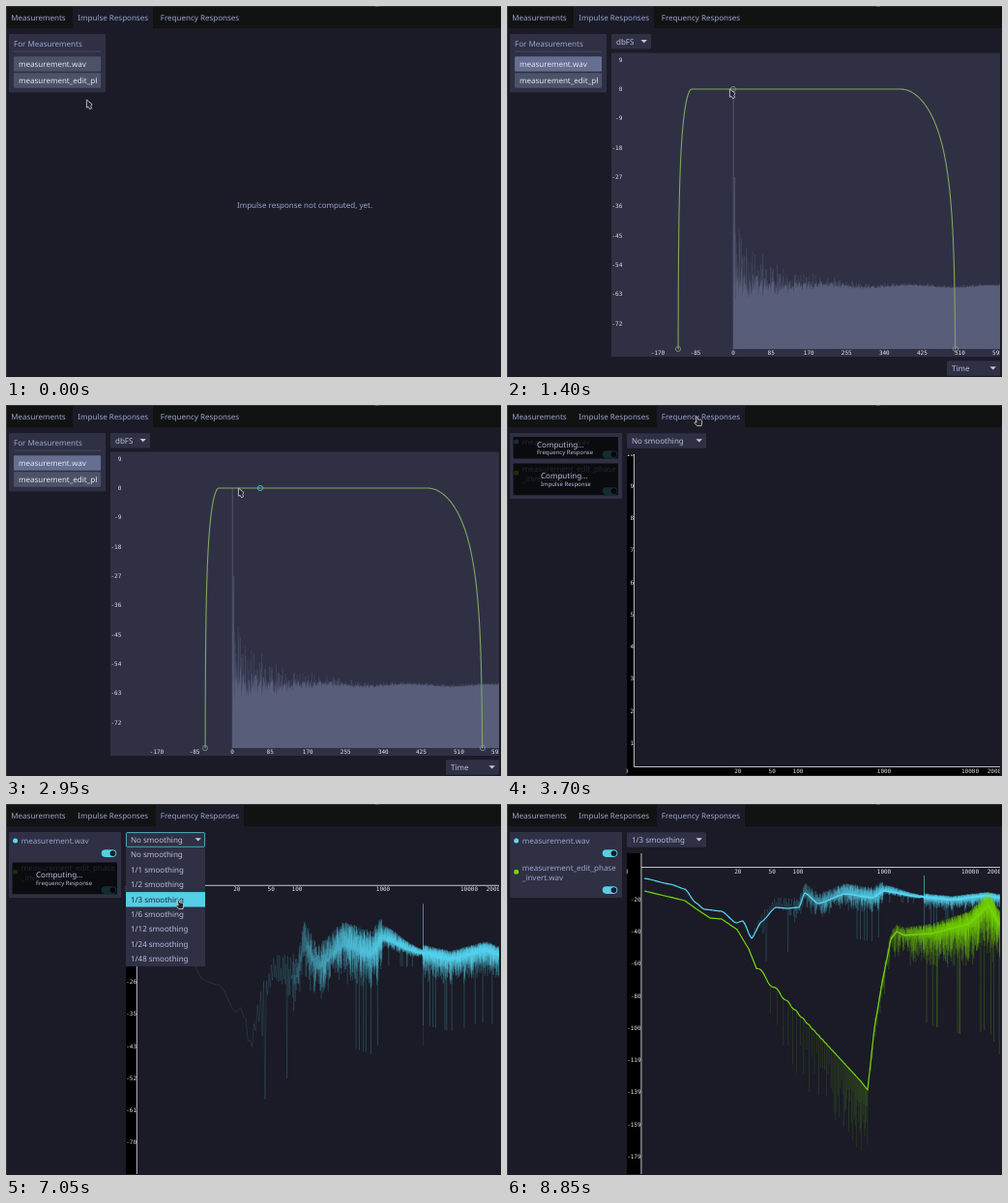
An HTML page for the animation above (9600 ms loop, 512 by 384 pixels).

```html
<!DOCTYPE html>
<html lang="en">
<head>
<meta charset="utf-8">
<title>Impulse and frequency responses</title>
<style>
  html, body { margin: 0; width: 100%; height: 100%; overflow: hidden; background: #1a1b26; }
  svg { display: block; width: 512px; height: 384px; }
  text { font: 8px "Noto Sans", sans-serif; fill: #9aa5ce; white-space: pre; text-rendering: geometricPrecision; }
  .lit { fill: #e4e6ef; }
  .soft { fill: #b9c0dc; }
  .small { font-size: 6px; }
  .num { font: 6px "DejaVu Sans Mono", monospace; fill: #e2e3e8; }
  .mid { text-anchor: middle; }
  .end { text-anchor: end; }
  .line { fill: none; stroke-linejoin: round; vector-effect: non-scaling-stroke; }
</style>
</head>
<body>
<svg id="stage" viewBox="0 0 512 384"></svg>
<script>
const LOOP = 9600, STEP = 50;
const PANEL = '#2f3044', BASE = '#1a1b26', CYAN = '#5cd8f5', GREEN = '#76d60c', FOCUS = '#55cfe5';

const rect = (x, y, w, h, fill, extra = '') =>
  `<rect x="${x}" y="${y}" width="${w}" height="${h}" fill="${fill}" ${extra}/>`;
const text = (x, y, s, cls = '', extra = '') =>
  `<text x="${x}" y="${y}" class="${cls}" ${extra}>${s}</text>`;
const dot = (x, y, r, fill, extra = '') =>
  `<circle cx="${x}" cy="${y}" r="${r}" fill="${fill}" ${extra}/>`;
const line = (d, color, width = 1, opacity = 1) =>
  `<path class="line" d="${d}" stroke="${color}" stroke-width="${width}" stroke-opacity="${opacity}"/>`;
const group = (id, body, extra = '') => `<g id="${id}" ${extra}>${body}</g>`;
const range = n => [...Array(n).keys()];
const smooth = u => u * u * (3 - 2 * u);

function random(seed) {
  return () => {
    seed = (seed * 1664525 + 1013904223) >>> 0;
    return seed / 4294967296;
  };
}

// Piecewise interpolation; each key is [position, value, ...].
function at(keys, x, col = 1, ease = u => u) {
  if (x <= keys[0][0]) return keys[0][col];
  for (let i = 1; i < keys.length; i++) {
    const a = keys[i - 1], b = keys[i];
    if (x <= b[0]) return a[col] + (b[col] - a[col]) * ease((x - a[0]) / (b[0] - a[0]));
  }
  return keys[keys.length - 1][col];
}

const points = s => s.split(' ').map(p => p.split(',').map(Number));
const poly = pts => 'M' + pts.map(p => p[0].toFixed(2) + ' ' + p[1].toFixed(1)).join('L');
const plot = (fn, from, to, dx) =>
  poly(range(Math.floor((to - from) / dx) + 1).map(i => [from + i * dx, fn(from + i * dx)]));

/* ---------- shared widgets ---------- */
const arrow = (x, y) => `<path d="M${x} ${y}h6.4l-3.2 3.2z" fill="#c3c8dc"/>`;
const pick = (x, y, w, label, id = '') =>
  rect(x, y, w, 15.4, PANEL, 'rx="1"') + text(x + 5, y + 10.5, label, 'soft', id && `id="${id}"`) +
  arrow(x + w - 10.5, y + 6);

const tabs = rect(0, 0, 512, 23, '#111313') +
  rect(69, 1, 83, 22, BASE, 'id="tabIR"') + rect(155, 1, 91, 22, BASE, 'id="tabFR"') +
  text(5.3, 14.5, 'Measurements') + text(74.3, 14.5, 'Impulse Responses') +
  text(159.8, 14.5, 'Frequency Responses') +
  rect(0, 0, 512, 1, '#2b3338') + rect(382, 0, 4, 1, '#3a5a78') + rect(0, 0, 1, 384, '#32353d');

/* ---------- impulse page ---------- */
const list = rect(3, 29, 100, 60.5, PANEL, 'rx="1"') + text(8, 42, 'For Measurements') +
  rect(8, 46.7, 90, 0.8, '#4a4d66') +
  rect(8, 52.3, 90, 15.4, '#4c5268', 'rx="1" id="btn"') + text(13, 62.9, 'measurement.wav', 'lit') +
  rect(8, 69.3, 90, 15.4, '#4c5268', 'rx="1"') +
  `<g clip-path="url(#btnClip)">${text(13, 79.9, 'measurement_edit_phase', 'lit')}</g>`;

// Two exponential decays above a gently waving noise floor.
function impulseBars() {
  const rnd = random(11);
  let solid = 'M234 355', spikes = '';
  for (let x = 234.5; x <= 510; x += 0.5) {
    const d = x - 234, wave = 1.2 * Math.sin(x / 14);
    const up = 288 + wave - 85 * Math.exp(-d / 4) - 58 * Math.exp(-d / 50);
    const down = 291 + wave + 20 * Math.exp(-d / 50);
    solid += `L${x} ${(down - (down - up) * rnd() * 0.5).toFixed(1)}`;
    spikes += `M${x} 355V${(up + (down - up) * rnd() ** 0.6).toFixed(1)}`;
  }
  return `<path d="${solid}V355Z" fill="#5a607c"/>` + line(spikes, '#5a607c', 0.5, 0.7) +
    line('M234.2 355V86', '#5a607c', 0.8) + line('M235.6 355V177', '#5a607c', 0.7);
}

const ring = (x, y, extra = 'stroke="#8c91a3"') => dot(x, y, 2.6, 'none', `stroke-width=".8" ${extra}`);

// Tapered window on the dB scale: a quarter of each side is a raised cosine.
function windowPath() {
  const y = u => Math.min(355, 86 - 20 * Math.log10(0.5 - 0.5 * Math.cos(Math.PI * u) || 1e-9) * 3.367);
  const us = range(91).map(i => (i / 90) ** 2);
  const rise = us.map(u => [177 + 14.25 * u, y(u)]);
  const fall = us.map(u => [464 - 57.5 * u, y(u)]).reverse();
  return poly(rise.concat(fall));
}

const impulse = pick(108, 29, 41, 'dbFS') + pick(455, 367.3, 55, 'Time') +
  rect(108, 48.5, 402, 314.5, PANEL) +
  `<g clip-path="url(#irClip)">` + impulseBars() +
  range(10).map(i => text(119.3, 57.6 + i * 30.33, 9 - 9 * i, 'num end')).join('') +
  range(10).map(i => text(156 + i * 39.05, 360.8, -170 + 85 * i, 'num mid')).join('') +
  group('win', line(windowPath(), '#80a85c', 1.1) + ring(177, 355) + ring(464, 355) +
    ring(234, 86, 'id="grip"')) + '</g>';

/* ---------- frequency page ---------- */
const toggle = y => rect(98.7, y, 15.6, 7.6, FOCUS, 'rx="3.8"') + dot(110.5, y + 3.8, 2.9, BASE);
const busy = (id, y, h) => group(id, rect(6.5, y, 108.5, h, '#000', 'opacity=".78"') +
  text(31, y + h / 2 - 0.6, 'Computing...', 'soft') +
  text(31, y + h / 2 + 6.6, 'Frequency Response', 'soft small'));

const cards = rect(3, 29, 116, 68, PANEL, 'rx="1"') +
  dot(9.6, 38, 2.5, CYAN) + text(15.8, 41, 'measurement.wav') + toggle(47.3) +
  dot(9.6, 70.3, 2.5, GREEN) + text(15.8, 68.6, 'measurement_edit_phase') +
  text(15.8, 78.8, '_invert.wav') + toggle(85.3) +
  busy('busy1', 33, 22.5) + busy('busy2', 60.5, 32.8);

const freqX = f => 301 + 89 * Math.log10(f / 100);
const freqAt = x => 100 * 10 ** ((x - 301) / 89);

function axes(id, ax, ay, zero, step, strip = '') {
  const label = i => {
    const y = zero - 33.25 * i;
    return i && y > 48 && y < 376 ? text(ax - 0.3, y + 2.1, Math.round(step * i), 'num end') : '';
  };
  return group(id, rect(124, 51, ax - 124, 332, '#000') + strip +
    line(`M${ax} 51V${strip ? ay : 383}M${ax} ${ay}H510`, '#d5d6da', 0.9) +
    range(20).map(i => label(i - 9)).join('') + text(123.6, ay + 6, 0, 'num mid') +
    [20, 50, 100, 1000, 10000, 20000].map(f => text(freqX(f), ay + 6, f, 'num mid')).join(''),
    'clip-path="url(#frClip)"');
}

const cyanKeys = points('142,77 169,83 184,88 195,102 204,109 222,111 237,123 244,121 253,139 263,122 ' +
  '278,107 290,108 302,107 308,92 322,103 350,93 378,97 390,90 425,96 460,99 497,95 509,97');
const greenKeys = points('142,90 184,100 195,108 210,118 222,119 238,130 250,150 258,170 366,287 373,296 ' +
  '380,232 388,185 397,140 403,132 411,136 440,134 478,124 498,105 509,125');

const cyanFit = x => at(cyanKeys, x, 1, u => (u + smooth(u)) / 2);
// The falling slope carries a comb ripple, evenly spaced in hertz.
const COMB = 19.5;
const ripple = x => x < 258 || x > 366 ? 0
  : -4 * Math.cos(2 * Math.PI * (freqAt(x) - 38) / COMB) * Math.exp((258 - x) / 25);
const greenFit = x => at(greenKeys, x) + ripple(x);

// Distance of the raw bins above and below the fitted curve.
function cyanSpread(x) {
  if (x > 431.5) return [4, 13];
  if (x > 389) return [7 - (x - 389) / 8, 5 - (x - 389) / 14];
  const ramp = Math.min(1, Math.max(0, (x - 238) / 30));
  return [11 * ramp, 18 * ramp + 30 * Math.exp(-Math.abs(x - 253) / 1.2)];
}
const greenSpread = x => [6 + (x - 376) / 14, 24 + (x - 376) / 4.5];

// One jagged pass; bins crowd together on the log axis.
function jagged(fit, spread, from, seed, deep) {
  const rnd = random(seed * 7919), out = [];
  let low = false;
  for (let x = from; x < 510; x += Math.max(0.4, 2.2 * 10 ** ((250 - x) / 89))) {
    const [up, down] = spread(x);
    const fall = rnd() < deep ? 2.5 : rnd() * rnd();
    out.push([x, fit(x) + (low ? down * fall : -up * rnd() ** 0.7)]);
    low = !low;
  }
  return poly(out);
}

// Passes start further and further right, so the haze thickens with frequency.
const haze = (fit, spread, from, gap, count, color, opacity) =>
  range(count).map(i => line(jagged(fit, spread, from + gap * i, i + 3, 0.012), color, 0.6, opacity)).join('');

const cyanRaw = line(jagged(cyanFit, cyanSpread, 142, 2, 0.02), CYAN, 0.7, 0.17) +
  haze(cyanFit, cyanSpread, 296, 14, 10, CYAN, 0.19) +
  line('M431.5 74V98', CYAN, 0.8, 0.75) + line('M431.5 98V138', CYAN, 0.6, 0.2);

function greenRaw() {
  const rnd = random(23);
  let comb = '';
  for (let f = 38 + COMB / 2; f < 650; f += COMB / 2) {
    const x = freqX(f), y = greenFit(x);
    comb += `M${x.toFixed(1)} ${y.toFixed(1)}V${(y + 15 + 60 * rnd()).toFixed(1)}`;
  }
  return line(plot(greenFit, 142, 258, 2), GREEN, 0.7, 0.2) + line(comb, GREEN, 0.6, 0.22) +
    haze(greenFit, greenSpread, 376, 10, 11, GREEN, 0.2);
}

const options = ['No', '1/1', '1/2', '1/3', '1/6', '1/12', '1/24', '1/48'].map(s => s + ' smoothing');
const ROW = 15.4, MENU = 44.9;
const menu = rect(124, MENU, 82, ROW * 8, PANEL) + rect(124, MENU, 82, ROW, FOCUS, 'id="hover"') +
  options.map((s, i) => text(129, MENU + 10.5 + i * ROW, s, 'soft')).join('');

const response = cards +
  axes('axEmpty', 131.4, 374.5, 383, 1, rect(124, 375, 386, 8, '#000')) +
  axes('axOne', 135.3, 84.3, 84.3, 8.69) +
  axes('axTwo', 138.9, 65.5, 65.5, 19.91) +
  `<g clip-path="url(#frClip)">` + group('cyan', cyanRaw) + group('green', greenRaw()) +
  group('cyanFit', line(plot(cyanFit, 142, 509, 1), CYAN, 1.2)) +
  group('greenFit', line(plot(greenFit, 142, 509, 1), GREEN, 1.2)) + '</g>' +
  pick(124, 29.3, 82, options[0], 'choice') +
  rect(124.4, 29.6, 81.2, 14.7, 'none', `id="focus" rx="1" stroke="${FOCUS}" stroke-width=".8"`) +
  group('menu', menu);

/* ---------- stage ---------- */
const clip = (id, x, y, w, h) => `<clipPath id="${id}">${rect(x, y, w, h, '#000')}</clipPath>`;
const skin = 'fill="#24262c" stroke="#d9dadd" stroke-width=".8" stroke-linejoin="round"';
const stage = document.getElementById('stage');
stage.innerHTML = '<defs>' + clip('btnClip', 8, 69, 86, 16) + clip('irClip', 108, 48, 402, 315) +
  clip('frClip', 123.5, 51, 386.5, 333) + '</defs>' + rect(0, 0, 512, 384, BASE) + tabs +
  group('list', list) + text(309, 209, 'Impulse response not computed, yet.', 'mid', 'id="empty"') +
  group('impulse', impulse) + group('response', response) +
  group('cursor', `<path id="point" d="M.4 0V8.2L2.2 7.4 3.6 9.8 5.5 8.8 4.8 6.6 6 4.6Z" ${skin}/>` +
    `<path id="hand" d="M-1.9 0Q-.9-.8-.3.4L.7 3 3.5 3.2Q4.9 3.6 4.7 5.6L4.1 9.6H-.3L-3.1 6.4Q-3.1 5.2-1.7 5.8L-.9 6Z" ${skin}/>`);

const $ = id => document.getElementById(id);
const show = (id, on) => $(id).setAttribute('display', on ? 'inline' : 'none');
const set = (id, key, value) => $(id).setAttribute(key, value);

// Keys: [time, shift] for the window, [time, x, y] for the pointer.
const drag = [[1450, 0], [2050, 34], [2100, 34], [2500, 62], [2750, 62], [2950, 29], [3000, 10], [3100, 0]];
const path = [[0, 83, 97], [200, 132, 126], [450, 58, 60], [500, 56, 60], [1150, 56, 60], [1400, 230, 86],
  [3400, 230, 86], [3650, 197, 12], [3750, 197, 12], [4200, 172, 62], [4850, 172, 62], [5050, 173, 38],
  [5450, 173, 38], [5700, 179, 102], [5800, 179, 99], [8600, 179, 99], [8850, 376, -14]];

function draw(t) {
  const within = (a, b) => t >= a && t < b;
  const freq = t >= 3650, one = t >= 4000, two = t >= 7150, open = within(5200, 7300);
  // The window follows the pointer one step late.
  const x = at(path, t, 1, smooth) + (within(1400, 3150) ? at(drag, t + STEP) : 0);
  const y = at(path, t, 2, smooth);

  show('tabIR', !freq);
  show('tabFR', freq);
  show('list', !freq);
  show('empty', t < 1150);
  show('impulse', t >= 1150 && !freq);
  show('response', freq);

  set('btn', 'fill', t >= 1150 ? '#666f92' : t >= 400 ? '#5a6180' : '#4c5268');
  set('win', 'transform', `translate(${at(drag, t)} 0)`);
  set('grip', 'stroke', within(1450, 3400) ? FOCUS : '#8c91a3');

  const second = t >= 7050;
  show('busy1', !one);
  show('busy2', !two);
  $('busy2').lastChild.textContent = second ? 'Frequency Response' : 'Impulse Response';
  for (const el of $('busy2').querySelectorAll('text')) el.setAttribute('x', second ? 31 : 35);

  show('axEmpty', !one);
  show('axOne', one && !two);
  show('axTwo', two);
  show('cyan', one);
  set('cyan', 'transform', two ? '' : 'matrix(1 0 0 2.284 0 -65.6)');
  show('green', two);
  show('cyanFit', t >= 7650);
  show('greenFit', t >= 7750);

  $('choice').textContent = options[t >= 7300 ? 3 : 0];
  show('focus', within(5000, 7300));
  show('menu', open);
  const row = Math.floor((y - MENU) / ROW);
  show('hover', open && row >= 0);
  set('hover', 'y', MENU + Math.max(0, row) * ROW);
  $('menu').querySelectorAll('text').forEach((el, i) => { el.style.fill = i === row ? '#20222c' : ''; });

  const hand = within(400, 1150) || within(3600, 3850) || within(5000, 7300);
  show('hand', hand);
  show('point', !hand);
  show('cursor', t < 8850);
  set('cursor', 'transform', `translate(${x.toFixed(1)} ${y.toFixed(1)})`);
}

let start;
function tick(now) {
  start ??= now;
  draw(Math.floor(((now - start) % LOOP) / STEP) * STEP);
  requestAnimationFrame(tick);
}
draw(0);
requestAnimationFrame(tick);
</script>
</body>
</html>
```
